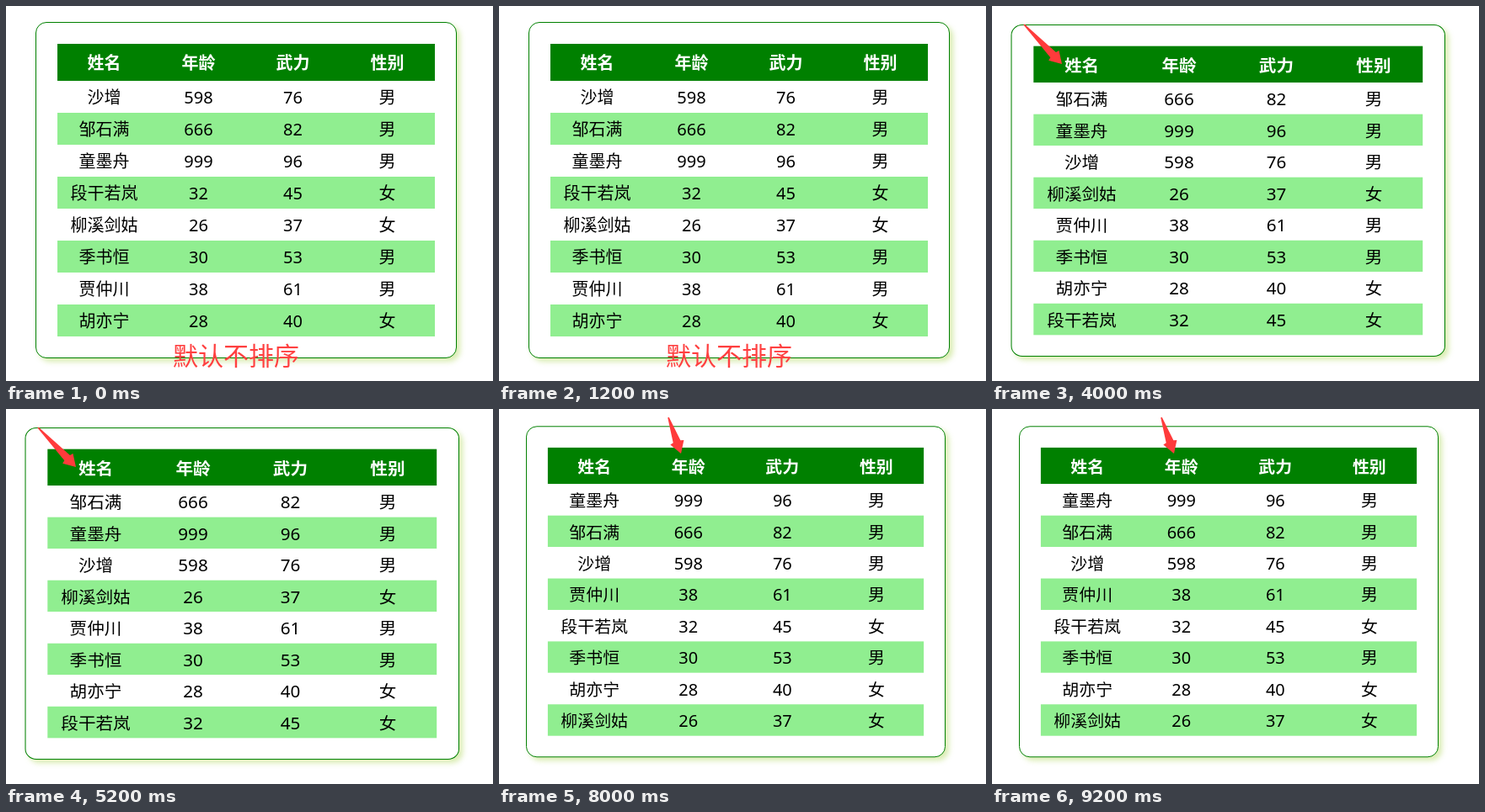
An HTML page that plays this animation: 578 px wide and 446 px high, repeating every 10000 ms.

```html
<!DOCTYPE html>
<html lang="zh-CN">
<head>
<meta charset="utf-8">
<title>表格排序</title>
<style>
  html, body { margin: 0; width: 100%; height: 100%; overflow: hidden; background: #fff; }
  svg { display: block; width: 100%; height: 100%; }
  text { text-anchor: middle; font: 20px "Noto Sans", "Noto Sans CJK SC", sans-serif; }
  .head { font-weight: 700; fill: #fff; }
  .caption { font: 300 30px "Noto Sans CJK SC", serif; fill: #ff4040; }
</style>
</head>
<body>
<svg id="stage" viewBox="0 0 578 446" xmlns="http://www.w3.org/2000/svg">
  <defs>
    <filter id="shadow" x="-10%" y="-10%" width="120%" height="120%" color-interpolation-filters="sRGB">
      <feDropShadow dx="4" dy="4" stdDeviation="3" flood-color="yellowgreen" flood-opacity=".38"/>
    </filter>
  </defs>
</svg>
<script>
const NS = 'http://www.w3.org/2000/svg';
const HOLD = 2000;
const PAD = 26, HEAD = 44, ROW = 38, COL = 112;
const titles = ['姓名', '年龄', '武力', '性别'];

const people = [
  ['沙增', 598, 76, '男', 'sha'],
  ['邹石满', 666, 82, '男', 'zou'],
  ['童墨舟', 999, 96, '男', 'tong'],
  ['段干若岚', 32, 45, '女', 'duan'],
  ['柳溪剑姑', 26, 37, '女', 'liu'],
  ['季书恒', 30, 53, '男', 'ji'],
  ['贾仲川', 38, 61, '男', 'jia'],
  ['胡亦宁', 28, 40, '女', 'hu']
];
const AGE = 1, PINYIN = 4;

// box: left, top, right, bottom of the card; arrow: tail x, y, tip x, y
const scenes = [
  { box: [35, 19, 535, 419], caption: ['默认不排序', 238, 398] },
  { box: [23, 24, 548, 418.6], key: PINYIN, arrow: [38, 15, 76, 63], caption: ['按姓名排序', 120, 393] },
  { box: [22.5, 22, 538, 417], key: PINYIN, desc: true, arrow: [38, 22, 83, 69] },
  { box: [29.5, 20, 544.5, 420], key: AGE, arrow: [223.5, 16, 225, 56], caption: ['按年龄排序', 220, 397] },
  { box: [32, 20.3, 530, 414.3], key: AGE, desc: true, arrow: [201, 10, 216, 53] }
];

function add(parent, tag, attrs, content = '') {
  const node = document.createElementNS(NS, tag);
  for (const name in attrs) node.setAttribute(name, attrs[name]);
  node.textContent = content;
  return parent.appendChild(node);
}

function sorted({ key, desc }) {
  if (key === undefined) return people;
  const rows = [...people].sort((a, b) => (a[key] < b[key] ? -1 : 1));
  return desc ? rows.reverse() : rows;
}

function drawRow(parent, cells, y, height, fill, cls) {
  add(parent, 'rect', { x: PAD, y, width: COL * 4, height, fill });
  cells.slice(0, 4).forEach((cell, i) => add(parent, 'text', {
    x: PAD + COL * (i + 0.5) - 0.5, y: y + height / 2 + 8.3, class: cls
  }, cell));
}

function drawArrow(parent, [tailX, tailY, tipX, tipY]) {
  const length = Math.hypot(tipX - tailX, tipY - tailY);
  const angle = Math.atan2(tipY - tailY, tipX - tailX) * 180 / Math.PI;
  add(parent, 'path', {
    d: `M0 0L-14 -8.5L-15 -4.6L${-length} -0.8V0.8L-15 4.6L-14 8.5Z`,
    transform: `translate(${tipX} ${tipY}) rotate(${angle})`,
    fill: '#ff3b3b'
  });
}

function buildScene(scene) {
  const [left, top, right, bottom] = scene.box;
  const group = add(document.getElementById('stage'), 'g', { visibility: 'hidden' });
  const card = add(group, 'g', {
    transform: `translate(${left} ${top}) scale(${(right - left) / 500} ${(bottom - top) / 400})`
  });
  add(card, 'rect', {
    x: 0.5, y: 0.5, width: 499, height: 399, rx: 12.5,
    fill: '#fff', stroke: 'green', filter: 'url(#shadow)'
  });
  drawRow(card, titles, PAD, HEAD, 'green', 'head');
  sorted(scene).forEach((person, i) =>
    drawRow(card, person, PAD + HEAD + ROW * i, ROW, i % 2 ? 'lightgreen' : '#fff', 'cell'));
  if (scene.caption) {
    const [label, x, y] = scene.caption;
    add(card, 'text', { x, y: y + 10, class: 'caption' }, label);
  }
  if (scene.arrow) drawArrow(group, scene.arrow);
  return group;
}

const groups = scenes.map(buildScene);

function render(time) {
  const current = Math.floor(time / HOLD) % groups.length;
  groups.forEach((group, i) => group.setAttribute('visibility', i === current ? 'visible' : 'hidden'));
}

const start = performance.now();
function tick() {
  render(performance.now() - start);
  requestAnimationFrame(tick);
}
tick();
</script>
</body>
</html>
```
